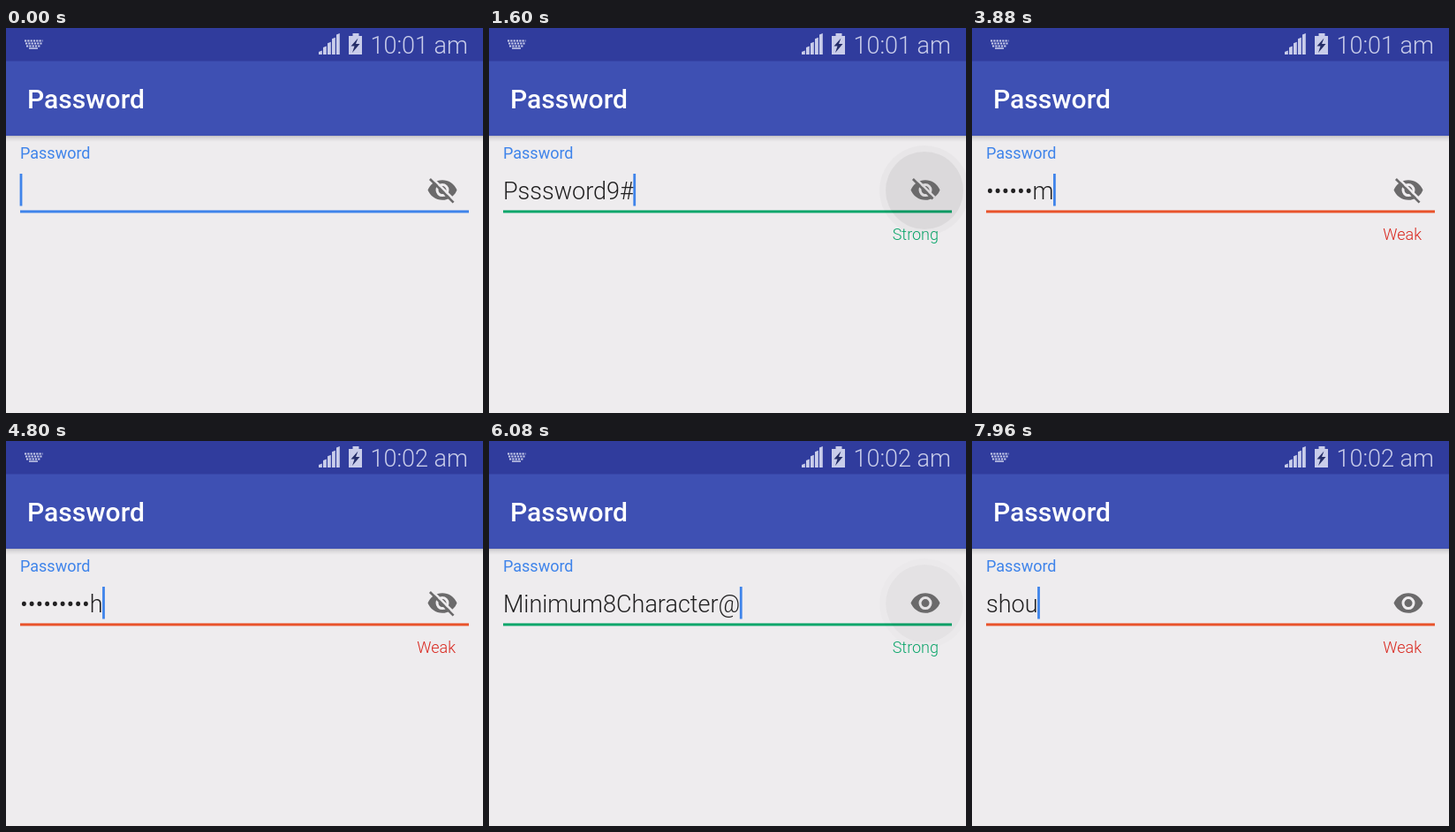
An HTML page that plays this animation: 540 px wide and 436 px high, repeating every 8000 ms.

```html
<!DOCTYPE html>
<html lang="en">
<head>
<meta charset="utf-8">
<title>Password field</title>
<style>
  html, body { margin: 0; width: 100%; height: 100%; overflow: hidden; background: #eeecee; }
  svg { display: block; width: 540px; height: 436px; font-family: Roboto, sans-serif; }
  .light { font-weight: 300; }
  .end { text-anchor: end; }
  #field { font-size: 27px; fill: #212021; white-space: pre; }
</style>
</head>
<body>
<svg viewBox="0 0 540 436">
  <defs>
    <linearGradient id="shade" x2="0" y2="1">
      <stop offset="0" stop-color="#000" stop-opacity=".27"/>
      <stop offset=".35" stop-color="#000" stop-opacity=".1"/>
      <stop offset="1" stop-color="#000" stop-opacity="0"/>
    </linearGradient>
    <mask id="gap" maskUnits="userSpaceOnUse" x="0" y="0" width="24" height="24">
      <path fill="#fff" d="M0 0H24V24H0Z"/>
      <path class="slash" transform="translate(1.27 -1.27)" stroke="#000" stroke-width="1.8" stroke-linecap="square"/>
    </mask>
  </defs>

  <rect width="540" height="436" fill="#eeecee"/>
  <rect y="121" width="540" height="8" fill="url(#shade)"/>
  <rect y="37" width="540" height="85" fill="#3e50b3"/>
  <rect width="540" height="37.5" fill="#303c9d"/>

  <g fill="#c9cdea">
    <path fill="none" stroke="#c9cdea" stroke-width="2" stroke-dasharray="2.2 1.1" d="M21 14.5H41.5M22 17.5H40.5M23 20.5H39.5"/>
    <path d="M26 22.3h10v1.5H26Z"/>
    <g id="signal"></g>
    <path d="M392.5 6h7v3h3.5v21h-15V9h4.5Z"/>
    <path fill="#252e68" d="M398.5 11.5 390.5 20.5h4l-2.5 7.5 8.5-10h-4.5Z"/>
    <text id="clock" class="light end" x="523" y="29" font-size="27"></text>
  </g>

  <text x="24" y="91" font-size="30" font-weight="500" fill="#fff">Password</text>
  <text x="16" y="148" font-size="18" fill="#3f84ea">Password</text>
  <text id="field" class="light" x="16" y="194"></text>
  <rect id="cursor" y="165" width="2.8" height="36.5" fill="#3f84ea"/>
  <rect id="line" x="16" y="206.4" width="508" height="3"/>
  <text id="strength" class="light end" x="509" y="240" font-size="18"></text>

  <g id="ripple">
    <circle cx="493" cy="184" r="51" fill-opacity=".025"/>
    <circle id="press" cx="493" cy="184" fill-opacity=".055"/>
  </g>
  <g transform="translate(476 165.6) scale(1.5)">
    <path mask="url(#gap)" fill="#6b6a6b" fill-rule="evenodd" d="M12 4.5C7 4.5 2.73 7.61 1 12c1.73 4.39 6 7.5 11 7.5s9.27-3.11 11-7.5c-1.73-4.39-6-7.5-11-7.5ZM12 17a5 5 0 1 1 0-10 5 5 0 0 1 0 10ZM12 9a3 3 0 1 0 0 6 3 3 0 0 0 0-6Z"/>
    <path class="slash" stroke="#6b6a6b" stroke-width="1.8" stroke-linecap="square"/>
  </g>
</svg>
<script>
const LOOP = 8000, BLINK = 160, MASK_DELAY = 400, TOGGLE_DELAY = 130;
const $ = id => document.getElementById(id);
const clamp = v => Math.max(0, Math.min(1, v));
const smooth = v => { v = clamp(v); return v * v * (3 - 2 * v); };

const taps = [1440, 1860, 5830];
const events = taps.map(t => ({ t: t + TOGGLE_DELAY, toggle: true }));

function type(chars, ...times) {
  times.forEach((t, i) => events.push({ t, char: chars[i] }));
}
function erase(count, from, to) {
  for (let i = 0; i < count; i++) events.push({ t: from + (to - from) * i / (count - 1) });
}

type('Psssword9#', 120, 240, 360, 440, 560, 680, 800, 920, 1080, 1240);
erase(10, 2160, 2560);
type('Minimum', 2980, 3080, 3200, 3300, 3400, 3640, 3840);
type('8Character@', 4400, 4640, 4800, 4920, 5000, 5120, 5280, 5360, 5480, 5600, 5720);
erase(18, 7080, 7480);
type('shou', 7620, 7760, 7860, 7940);
events.sort((a, b) => a.t - b.t);

function stateAt(t) {
  const s = { text: '', shown: false, used: false, edited: 0, typed: -LOOP, toggled: -LOOP };
  for (const e of events) {
    if (e.t > t) break;
    s.edited = e.t;
    if (e.toggle) {
      s.shown = !s.shown;
      s.toggled = e.t;
    } else if (e.char) {
      s.text += e.char;
      s.used = true;
      s.typed = e.t;
    } else {
      s.text = s.text.slice(0, -1);
      s.typed = -LOOP;
    }
  }
  return s;
}

function visibleText(s, t) {
  if (s.shown) return s.text;
  const clear = t - s.typed < MASK_DELAY && s.toggled < s.typed ? 1 : 0;
  const hidden = s.text.length - clear;
  return '•'.repeat(hidden) + s.text.slice(hidden);
}

const isStrong = text => [/[a-z]/, /[A-Z]/, /\d/, /[^\w]/].every(rule => rule.test(text));

function drawSlash(s, t) {
  const change = smooth((t - s.toggled) / 120);
  const length = 16.47 * (s.shown ? 1 - change : change);
  document.querySelectorAll('.slash').forEach(path => {
    path.setAttribute('d', `M3.27 4.27l${length} ${length}`);
    path.style.visibility = length > 0.05 ? 'visible' : 'hidden';
  });
}

function drawRipple(t) {
  const start = taps.find(tap => t >= tap && t < tap + 330);
  const age = start === undefined ? 330 : t - start;
  $('ripple').style.opacity = clamp(age / 60) * clamp((330 - age) / 150);
  $('press').setAttribute('r', 44 * smooth(age / 130));
}

function draw(t) {
  const s = stateAt(t);
  const strong = isStrong(s.text);
  $('field').textContent = visibleText(s, t);
  $('cursor').setAttribute('x', 15.6 + (s.text ? $('field').getComputedTextLength() : 0));
  $('cursor').style.opacity = (t - s.edited) % (2 * BLINK) < BLINK ? 1 : 0;
  $('line').setAttribute('fill', !s.used ? '#3f84ea' : strong ? '#0ca66b' : '#e8532b');
  $('strength').textContent = !s.used ? '' : strong ? 'Strong' : 'Weak';
  $('strength').setAttribute('fill', strong ? '#0ca66b' : '#d9281f');
  $('clock').textContent = t < 4800 ? '10:01 am' : '10:02 am';
  drawSlash(s, t);
  drawRipple(t);
}

$('signal').innerHTML = [0, 1, 2, 3, 4].map(i => {
  const x = 354 + i * 5, top = 25.5 - i * 4.9;
  return `<path d="M${x} 30V${top + 1.5}L${x + 3.8} ${top}V30Z"/>`;
}).join('');

const begin = performance.now();
function tick() {
  draw((performance.now() - begin) % LOOP);
  requestAnimationFrame(tick);
}
tick();
</script>
</body>
</html>
```
